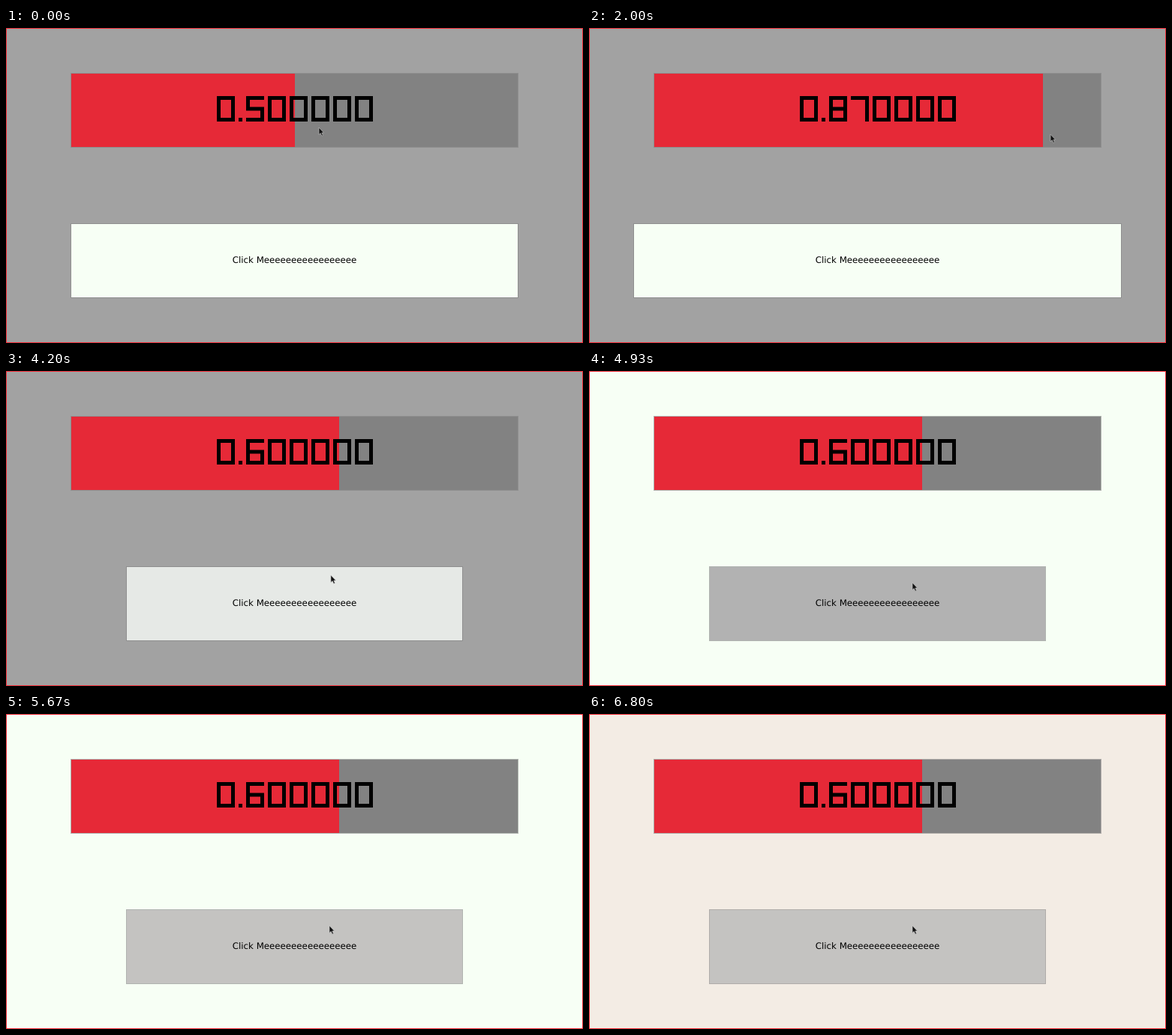
An HTML page for the animation above (6940 ms loop, 769 by 421 pixels).

```html
<!DOCTYPE html>
<html lang="en">
<head>
<meta charset="utf-8">
<title>Slider and button</title>
<style>
  html, body { margin: 0; width: 100%; height: 100%; overflow: hidden; }
  #stage { position: relative; width: 769px; height: 421px; overflow: hidden; }
  #stage::after { content: ""; position: absolute; inset: 0; border: 1px solid #ee2a34; }
  #slider, #button {
    position: absolute; box-sizing: border-box; height: 100px;
    border: 1px solid #82828299; background-clip: padding-box;
  }
  #slider { left: 86px; top: 60px; width: 597px; background-color: #828282; }
  #fill { height: 100%; background: #e62937; }
  #button { top: 261px; display: flex; align-items: center; justify-content: center; }
  #label {
    position: relative; top: -.6px; margin: 0 -2px; color: #000; word-break: break-all;
    font: 11.8px/12px "DejaVu Sans", sans-serif; text-rendering: geometricPrecision;
  }
  svg { position: absolute; left: 0; top: 0; }
  #readout path { stroke: #000; stroke-width: 5; stroke-linecap: square; }
</style>
</head>
<body>
<div id="stage">
  <div id="slider"><div id="fill"></div></div>
  <div id="button"><span id="label">Click Meeeeeeeeeeeeeeeee</span></div>
  <svg width="769" height="421">
    <g id="readout" role="img"></g>
    <path id="cursor" d="M0 0V9.5L2.2 7.6L3.8 11.2L5.4 10.4L3.9 7H6.6Z" fill="#111" stroke="#ccc" stroke-width=".6"/>
  </svg>
</div>
<script>
const LOOP = 6940, STEP = 1000 / 15;
const TRACK = 596, CENTER = 384.5;
const GRAB = 260;  // from the first press on, the slider sets the button's width
const CLICK = 4330, FADED = 4800;

const GREY = [162, 162, 162], PALE = [247, 255, 245], WARM = [243, 236, 228];
const HOVER = [230, 233, 230], PRESSED = [178, 178, 178], RELEASED = [196, 195, 193];

// Seven segments, and those lit for each digit
const SEGMENTS = {
  a: "M0 0h19", b: "M19 0v14.5", c: "M19 14.5v14.5", d: "M0 29h19",
  e: "M0 14.5v14.5", f: "M0 0v14.5", g: "M0 14.5h19"
};
const LIT = "abcdef bc abged abgcd fgbc afgcd afgecd abc abcdefg abcdfg".split(" ");

const get = id => document.getElementById(id);
const [stage, fill, button, readout, cursor] =
  ["stage", "fill", "button", "readout", "cursor"].map(get);

// Eased progress from 0 to 1 between two times
function ease(t, start, end) {
  const p = Math.min(1, Math.max(0, (t - start) / (end - start)));
  return 1 - (1 - p) ** 2;
}

const mix = (a, b, p) => a.map((v, i) => v + (b[i] - v) * p);
const rgb = c => `rgb(${c.map(Math.round)})`;

// Four drags of the slider: left, right, left, right
function valueAt(t) {
  const v = .5 - .3 * ease(t, 720, 1400) + .68 * ease(t, 1530, 2070)
    - .68 * ease(t, 2150, 2880) + .4 * ease(t, 3070, 3800);
  return Math.round(v * 100) / 100;
}

// The pointer drags the fill's edge, then glides down to the button
function pointerAt(t, value) {
  const edge = 84 + TRACK * value + 35 * (1 - ease(t, 0, 730)) + 16 * ease(t, 940, 2930);
  const height = 133 - 8 * ease(t, 0, 930) + 22 * ease(t, 930, 2930);
  return mix([edge, height], [431, 283], ease(t, 3850, CLICK));
}

function backAt(t) {
  return t > 6300 ? WARM : mix(GREY, PALE, ease(t, CLICK, FADED));
}

function faceAt(t) {
  if (t > 5590) return RELEASED;
  if (t > CLICK) return mix(HOVER, PRESSED, ease(t, CLICK, FADED));
  return mix(PALE, HOVER, ease(t, 4060, 4200));
}

function showNumber(text) {
  if (readout.getAttribute("aria-label") === text) return;
  readout.setAttribute("aria-label", text);
  let x = 283.5;
  readout.innerHTML = [...text].map(ch => {
    const dot = ch === ".";
    const d = dot ? "M0 29h0" : [...LIT[ch]].map(s => SEGMENTS[s]).join("");
    const mark = `<path transform="translate(${x} 93.5)" d="${d}"/>`;
    x += dot ? 10 : 29;
    return mark;
  }).join("");
}

function draw(now) {
  const t = Math.floor((now % LOOP + 5) / STEP) * STEP;
  const value = valueAt(t);
  const width = t < GRAB ? TRACK : TRACK * value / .8;
  const left = Math.round(CENTER - width / 2) - 1;

  fill.style.width = value * 100 + "%";
  showNumber(value.toFixed(6));
  button.style.left = left + "px";
  button.style.width = 769 - 2 * left + "px";
  button.style.backgroundColor = rgb(faceAt(t));
  stage.style.backgroundColor = rgb(backAt(t));
  cursor.setAttribute("transform", `translate(${pointerAt(t, value)})`);
}

function tick() {
  draw(performance.now());
  requestAnimationFrame(tick);
}
tick();
</script>
</body>
</html>
```
